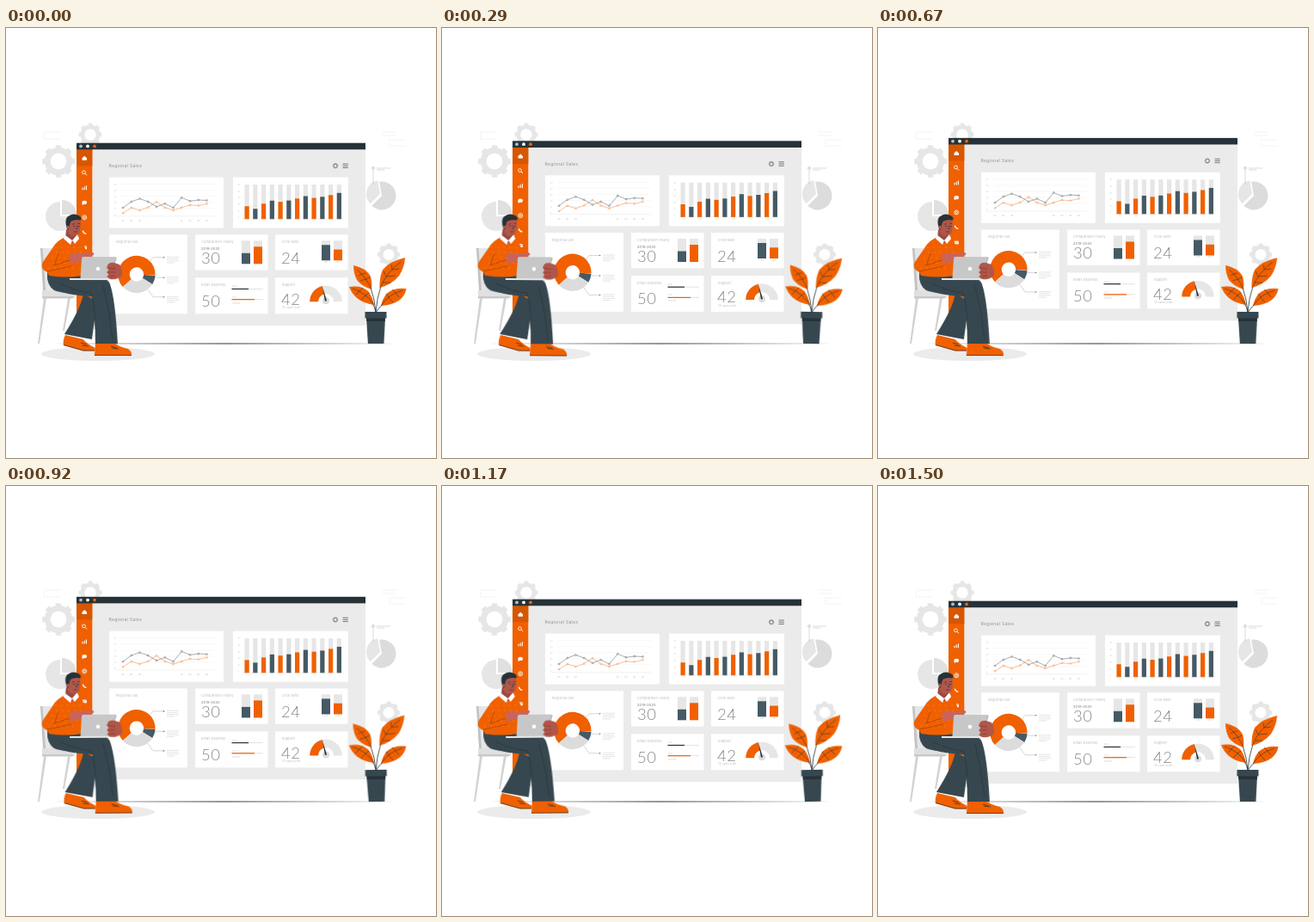
Animation, 500 px wide and 500 px high, one loop 1540 ms. Source, as an HTML page:

```html
<!DOCTYPE html>
<html lang="en">
<head>
<meta charset="utf-8">
<title>Dashboard</title>
<style>
html, body { margin: 0; width: 100%; height: 100%; overflow: hidden; background: #fff; }
svg { display: block; width: 100%; height: 100%; }
text { font-family: Inter, sans-serif; fill: #909090; }
.num { font: 300 18.5px Lato, sans-serif; letter-spacing: .6px; fill: #8a8a8a; }
.cap { font-size: 4px; letter-spacing: .1px; fill: #bdbdbd; }
.tiny { font-size: 2px; fill: #c4c4c4; }
#man { transform-origin: 80px 275px; }
#plant { transform-origin: 430px 317px; }
</style>
</head>
<body>
<svg viewBox="0 0 500 500">
  <g id="back"></g>
  <path d="M48 367Q254 366.200 460 367Q254 367.800 48 367Z" fill="#263238"/>
  <g id="board"></g>
  <ellipse cx="107" cy="379" rx="66" ry="8" fill="#ebebeb"/>

  <g id="chair">
    <path d="M40 256H58L64 312H44Z" fill="#e6e6e6"/>
    <path d="M40 256H42.500L46.500 312H43.500Z" fill="#c2c2c2"/>
    <path d="M42 305H80V314H42Z" fill="#e0e0e0"/>
    <path d="M42 312H78V314.500H42Z" fill="#c9c9c9"/>
    <path d="M44 314H47L39 367H37ZM72 314H75L68 352H66Z" fill="#d2d2d2"/>
  </g>

  <g id="man">
    <g fill="#f06000">
      <path d="M69 357L90 362Q94 367 102 371Q105 373 103 375.500H90L67 369Q66 363 69 357Z"/>
      <path d="M104 366H126Q132 371 142 373Q147 376 146 381H103Z"/>
    </g>
    <path d="M67 368.500L90 375H103M103 380.500H146" fill="none" stroke="#263238" stroke-width=".7"/>
    <path d="M87 366l7 2m-5 1l7 1M122 370l7 2m-6 0l8 1" stroke="#263238" stroke-width=".7"/>
    <path d="M48 285Q47 299 56 305Q66 309 90 309Q87 326 68 356L100 362L106 318Z" fill="#37474f"/>
    <path d="M48 284L90 286Q118 288 121 298Q127 315 130 367H104Q104 334 100 312Q70 311 55 303Q48 296 48 284Z" fill="#37474f"/>
    <path d="M62 297Q84 307 99 308Q104 322 104 350M113 300Q121 330 124 362" fill="none" stroke="#263238" stroke-width=".6"/>

    <path d="M69 243Q59 247 54 256L43 272Q39 280 48 284L50 288Q70 291 88 288L93 263Q93 252 84 244Z" fill="#f06000"/>
    <g id="dots"></g>
    <path d="M61 263L56 276L74 270M48 283L76 277" fill="none" stroke="#7d3200" stroke-width=".5"/>
    <path d="M70 234L69 245L77 250L84 243L83 236Z" fill="#984a40"/>
    <path d="M69 241L67 245L75 252L77 247ZM83 240L85 245L80 251L77 247Z" fill="#fff"/>
    <path d="M71 222Q69 238 76 241.500Q82 243 86 237Q87.500 230 86 221Z" fill="#b0564a"/>
    <path d="M70 230Q68 221 73 218.500Q78 215 83 217.500Q88.500 219 87 223.500Q81 222 76 224.500Q74 226 73.500 232L72 235Z" fill="#263238"/>
    <circle cx="72" cy="231.500" r="1.800" fill="#b0564a"/>
    <path d="M77 228.500l3-1M83 227.500l3 0M82 229.500l1 4h-2M79 237l4 0" fill="none" stroke="#263238" stroke-width=".6"/>
    <circle cx="79" cy="230.500" r=".5"/><circle cx="84.500" cy="230.500" r=".5"/>

    <path d="M74 264Q79 260 86 262L101 261Q104 263 100 265L89 271L75 274Z" fill="#c9645a"/>
    <path d="M74 291H120V293H74Z" fill="#e6e6e6"/>
    <path d="M90 266H127Q129 266 128.500 268L121 291H86.500L88 268Q88 266 90 266Z" fill="#c7c7c7"/>
    <path d="M128 267L121 291" stroke="#aaa" stroke-width=".6"/>
    <circle cx="107" cy="280" r="2.300" fill="#fff"/>
    <path d="M118 276Q120 272 126 273L132 275Q136 281 135 288Q130 293 121 292L117 289Q121 287 117 284Q121 281 117 279Z" fill="#b0564a"/>
    <path d="M119 279L127 280M119 284L127 284M120 289L127 288" stroke="#6b2d20" stroke-width=".5"/>
  </g>

  <g id="plant">
    <g fill="none" stroke="#263238" stroke-width=".8">
      <path d="M430 331Q429 316 424 302M430 331Q431 315 436 300M430 331Q430 325 424 318M430 331Q433 325 440 320"/>
    </g>
    <g fill="#f06000">
      <path d="M464 267Q446 271 438 281Q434 290 434.500 302Q449 298 457 288Q463 279 464 267Z"/>
      <path d="M404 276Q418 279 423.500 288Q426 295 425 304Q413 300 408 293Q404 286 404 276Z"/>
      <path d="M399 301Q413 298.500 421 306Q426 312 428 322Q415 320 408 314Q402 309 399 301Z"/>
      <path d="M465.500 303Q451 301.500 443 308.500Q438 314 436 323Q450 322 458 316Q464 311 465.500 303Z"/>
    </g>
    <g fill="none" stroke="#263238" stroke-width=".55">
      <path d="M459 272Q443 283 435 302M449 281l-1-6M442 289l-3-6M449 281l8-1M442 289l11-1M438 296l9 0"/>
      <path d="M408 281Q419 290 425 304M414 286l4-1M419 292l4-2M414 286l-4 2M419 292l-7 2"/>
      <path d="M403 303Q419 308 428 322M411 306l4-4M418 311l4-3M411 306l-4 4M418 311l-5 5"/>
      <path d="M461 305Q444 310 436 323M453 308l-4-4M445 313l-3-4M453 308l4 5M445 313l5 6"/>
    </g>
    <path d="M419 337H441L439.500 367H421Z" fill="#37474f"/>
    <path d="M417.500 330H442.500V337.500H417.500Z" fill="#37474f"/>
    <path d="M419 337.500H441L440.800 341H419.200Z" fill="#263238"/>
  </g>
</svg>
<script>
const ORANGE = '#f06000', SLATE = '#455a64', DARK = '#263238', PALE = '#ebebeb', GREY = '#dcdcdc';
const NS = 'http://www.w3.org/2000/svg';
const $ = id => document.getElementById(id);
let layer;

function add(tag, attrs, label) {
  const el = document.createElementNS(NS, tag);
  for (const k in attrs) el.setAttribute(k, attrs[k]);
  if (label !== undefined) el.textContent = label;
  return layer.appendChild(el);
}
const rect = (x, y, width, height, fill) => add('rect', { x, y, width, height, fill });
const dot = (cx, cy, r, fill, more) => add('circle', { cx, cy, r, fill, ...more });
const fill = (d, color) => add('path', { d, fill: color });
const line = (d, stroke, w = .5) => add('path', { d, stroke, 'stroke-width': w, fill: 'none' });
const text = (x, y, label, cls) => add('text', { x, y, class: cls }, label);

function gear(x, y, r, color) {
  dot(x, y, r * .68, 'none', { stroke: color, 'stroke-width': r * .36 });
  dot(x, y, r * .88, 'none', {
    stroke: color, 'stroke-width': r * .24, pathLength: 16,
    'stroke-dasharray': '1 1', 'stroke-dashoffset': .5
  });
}

// Ring sector; angles in degrees, clockwise from the right.
function sector(x, y, r, hole, from, to, color) {
  const at = (rad, deg) => {
    const a = deg * Math.PI / 180;
    return (x + rad * Math.cos(a)).toFixed(2) + ' ' + (y + rad * Math.sin(a)).toFixed(2);
  };
  const big = +(to - from > 180);
  fill(`M${at(r, from)}A${r} ${r} 0 ${big} 1 ${at(r, to)}L${at(hole, to)}` +
       `A${hole} ${hole} 0 ${big} 0 ${at(hole, from)}Z`, color);
}

function drawBack() {
  layer = $('back');
  gear(61, 155, 18.8, '#e6e6e6');
  gear(98, 124, 13.5, '#e6e6e6');
  gear(445, 263.5, 13, '#e6e6e6');
  sector(63, 219, 17, 0, 0, 270, '#e6e6e6');
  sector(65, 217, 17, 0, 270, 360, '#e0e0e0');
  sector(437, 195, 16.5, 0, -100, 135, GREY);
  sector(435, 193, 16, 0, 135, 260, '#e6e6e6');
  line('M427 165V182M431 163H447M431 165H440', '#c4c4c4', .6);
  dot(427, 163, 1.4, '#fff', { stroke: '#aaa', 'stroke-width': .6 });
  line('M63 121H44.500V129H63M437 121H453M437 125H453M465 130H446V137H465', '#eee', .7);
}

function drawIcons() {
  fill('M88.500 151L91.200 148.500L94 151V153.500H88.500Z', '#fff');
  dot(90.5, 167.5, 1.9, 'none', { stroke: '#fff', 'stroke-width': .9 });
  line('M92 169L94 171', '#fff', 1);
  line('M89 188V185.500M91.200 188V184.300M93.400 188V183', '#fff', 1.1);
  add('ellipse', { cx: 91.2, cy: 202.7, rx: 2.8, ry: 2.1, fill: '#fff' });
  fill('M88.700 203V206L91 204Z', '#fff');
  dot(91.2, 220, 2.5, 'none', { stroke: '#fff', 'stroke-width': .8 });
  dot(91.2, 220, 1.1, 'none', { stroke: '#fff', 'stroke-width': .8 });
  line('M89.300 235.300Q89.800 238.300 93.300 239', '#fff', 1.3);
  rect(88.6, 253.2, 5.2, 3.7, '#fff');
  line('M88.700 253.500L91.200 255.400L93.700 253.500', ORANGE, .5);
}

function drawLines() {
  for (let i = 0; i < 6; i++) {
    const y = 181.5 + i * 7;
    if (i < 5) line(`M134 ${y}H243`, '#ededed', .4);
    text(126, y + 1, 50 - i * 10, 'tiny');
  }
  line('M126 218.500H243', '#ddd', .4);
  const series = [
    [DARK, [208.7, 201.7, 198.2, 201.7, 207.5, 204, 208.7, 197, 201, 199.7, 200.2]],
    [ORANGE, [215, 208.7, 211.7, 208.3, 202, 208.5, 211.7, 208.5, 205.6, 206.2, 204]]
  ];
  for (const [color, ys] of series) {
    const pts = ys.map((y, i) => [136 + i * 9.75, y]);
    line('M' + pts.join('L'), color, .4);
    for (const [x, y] of pts) dot(x, y, .9, '#fff', { stroke: color, 'stroke-width': .4 });
  }
  for (let i = 0; i < 11; i++) if (i < 3 || i > 6) text(134 + i * 9.75, 225, 'Jan', 'tiny');
}

function drawBars() {
  const tops = [207, 210, 204, 200.5, 201.8, 200.3, 198, 195.2, 197.3, 196, 194, 191.5];
  tops.forEach((y, i) => {
    const x = 277.5 + i * 9.75;
    rect(x, 181.8, 5.2, 40, '#e6e6e6');
    rect(x, y, 5.2, 222 - y, i % 2 ? SLATE : ORANGE);
  });
  for (let i = 0; i < 6; i++) text(269.5, 183 + i * 7.6, 50 - i * 10, 'tiny');
  line('M275 222H392', '#ddd', .4);
}

function drawDonut() {
  const x = 151.9, y = 286.2, r = 21.7, hole = 8.2;
  text(128, 249.7, 'Regional use', 'cap');
  sector(x, y, r, hole, 138, 363, ORANGE);
  sector(x, y, r, hole, 4, 32, SLATE);
  sector(x, y, r, hole, 33, 137, GREY);
  line('M166 272L171 266.500H184M173 290H184M165 304L171 312.500H184', '#999', .4);
  for (const cy of [266.5, 290, 312.5]) {
    dot(183.5, cy, .8, '#777');
    line(`M187 ${cy - .5}H201M187 ${cy + 1.7}H200M187 ${cy + 3.9}H201M187 ${cy + 6.1}H196`, '#d2d2d2', .6);
  }
}

function column(x, top, bottom, level, color) {
  rect(x, top, 10, bottom - top, '#e6e6e6');
  rect(x, level, 10, bottom - level, color);
}

function drawCards() {
  text(227, 249.7, 'Comparison Yearly', 'cap');
  text(227, 257.5, '2019-2020', 'cap').style.fill = '#777';
  text(227, 273.8, '30', 'num');
  column(274, 247, 274, 261.5, SLATE);
  column(288, 247, 274, 254, ORANGE);

  text(320.5, 249.7, 'Click Rate', 'cap');
  text(320, 273.8, '24', 'num');
  column(367, 247, 270, 252, SLATE);
  column(381, 247, 270, 257.3, ORANGE);
  text(369.5, 273, '2019', 'tiny');
  text(383.5, 273, '2020', 'tiny');

  text(227, 299.7, 'Email Expense', 'cap');
  text(227, 323.3, '50', 'num');
  [[303.2, 282, DARK], [315.4, 289, ORANGE]].forEach(([y, end, color]) => {
    line(`M262.500 ${y}H299`, GREY, .8);
    line(`M262.500 ${y}H${end}`, color, 1.2);
    text(263, y - 2, '2020', 'tiny');
  });
  text(263, 320.3, 'Open rate', 'tiny');

  text(320.5, 299.7, 'Support', 'cap');
  text(320, 321.3, '42', 'num');
  text(321, 326, '12 spec part', 'cap').style.fontSize = '3.5px';
  sector(372, 318, 18.8, 9, 180, 257, ORANGE);
  sector(372, 318, 18.8, 9, 257, 360, '#e6e6e6');
  dot(372, 317, 4, GREY);
  fill('M371 317.500L367.700 299.500L373 317Z', DARK);
}

function drawBoard() {
  layer = $('board');
  rect(82, 140, 336, 206, PALE);
  rect(82, 140, 18.3, 206, ORANGE);
  rect(82, 140, 18.3, 20, '#d85600');
  rect(82, 133.3, 336, 7.7, DARK);
  dot(87, 137.2, 1.9, '#b0bec5');
  dot(95, 137.2, 1.9, '#fff');
  dot(103, 137.2, 1.9, ORANGE);
  drawIcons();
  add('text', { x: 119.5, y: 162, 'font-size': 5, 'letter-spacing': .3 }, 'Regional Sales');
  gear(383, 160, 3.2, '#888');
  line('M391.500 157.800H397.800M391.500 160H397.800M391.500 162.200H397.800', '#777', 1);
  rect(120, 173.3, 133, 59, '#fff');
  rect(264, 173.3, 134, 59, '#fff');
  rect(120, 240, 91, 92, '#fff');
  for (const x of [220, 313]) {
    rect(x, 240, 84.5, 41.3, '#fff');
    rect(x, 290, 84.5, 42, '#fff');
  }
  drawLines();
  drawBars();
  drawDonut();
  drawCards();
}

function drawDots() {
  layer = $('dots');
  for (let row = 0; row < 5; row++) {
    for (let col = 0; col < 5; col++) {
      const x = 58 + col * 7 - row * 2 + (row % 2) * 3;
      if (x < 88) dot(x, 255 + row * 6, .45, '#ffd3b3');
    }
  }
}

// One slow swing per loop; lag is the head start in ms.
const LOOP = 1540, SWING = 1500, LAG = 30, STEPS = 44;
function swing(id, pose) {
  const frames = [];
  for (let i = 0; i <= STEPS; i++) {
    const a = 2 * Math.PI * (i / STEPS * LOOP + LAG) / SWING;
    frames.push({ transform: pose(a) });
  }
  const anim = $(id).animate(frames, { duration: LOOP, iterations: Infinity });
  anim.startTime = 0;
}

drawBack();
drawBoard();
drawDots();
swing('board', a => `translateY(${.3 - 2.95 * (1 - Math.cos(a))}px)`);
swing('man', a => `rotate(${.55 * Math.sin(a)}deg)`);
swing('plant', a => `rotate(${1.1 * Math.sin(a)}deg)`);
</script>
</body>
</html>
```
